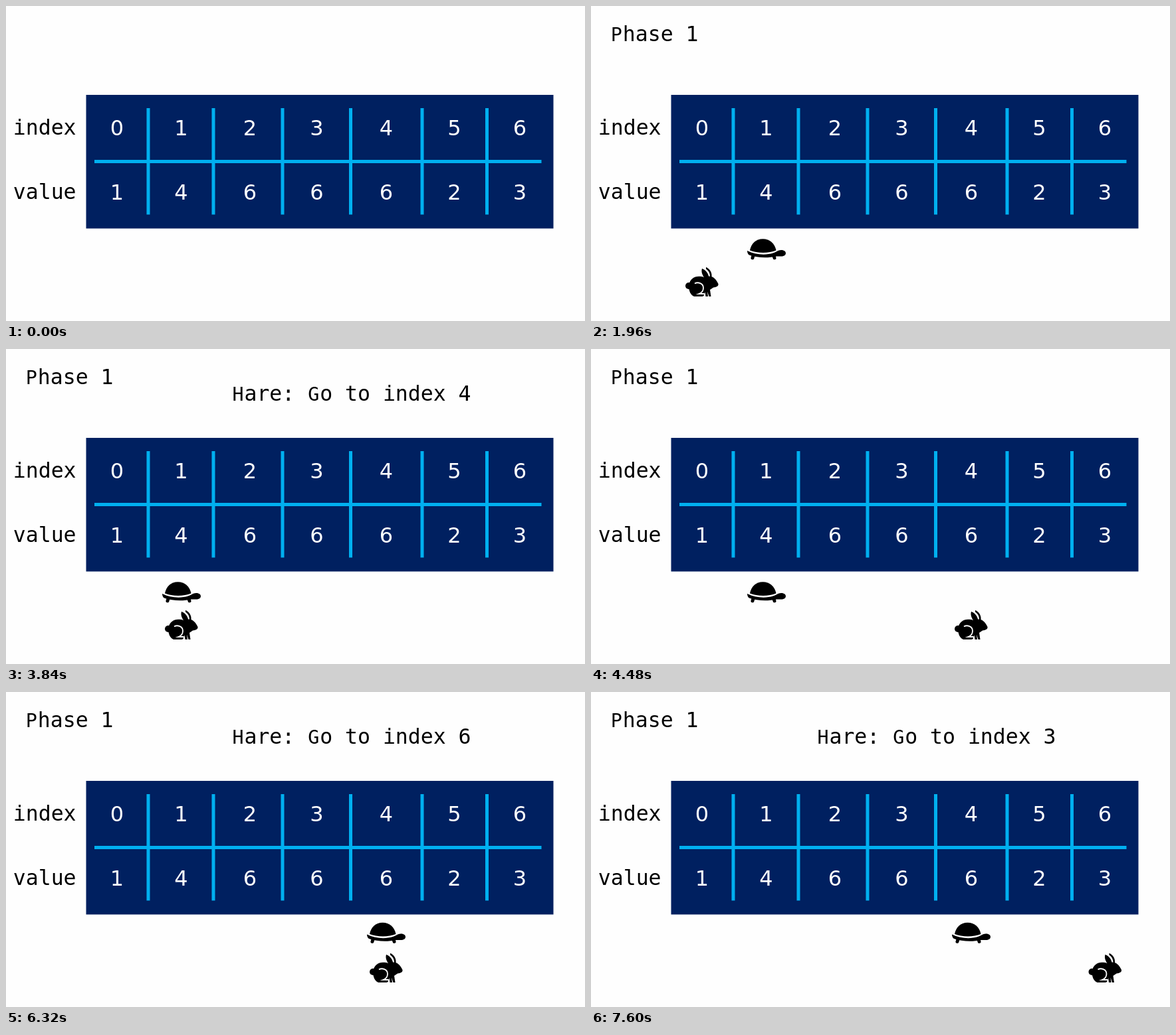
Animation, 871 px wide and 475 px high, one loop 8 s. Source, as an HTML page with a canvas:

```html
<!DOCTYPE html>
<html lang="en">
<head>
<meta charset="utf-8">
<title>Tortoise and hare</title>
<style>
html, body { margin: 0; width: 100%; height: 100%; overflow: hidden; background: #fefefe; }
canvas { display: block; }
</style>
</head>
<body>
<canvas id="stage" width="871" height="475"></canvas>
<script>
const ctx = document.getElementById('stage').getContext('2d');
const LOOP = 8000;
const SIZE = 31.5;
const ADVANCE = 18.95;

const values = [1, 4, 6, 6, 6, 2, 3];
const columns = [167, 263.5, 367, 467.5, 572, 674.5, 773];
const dividers = [214, 312, 416, 518.5, 626, 723.5];

const tortoiseAt = { 0: [138, 347], 1: [235, 350.5], 4: [543, 347] };
const hareAt = { 0: 142, 1: 239, 4: 547, 6: 748.5 };

// start time, tortoise cell, hare cell, instruction
const steps = [
  [0],
  [700, 0, 0, ''],
  [1340, 0, 0, 'Tortoise: Go to index 1'],
  [1960, 1, 0, ''],
  [2570, 1, 0, 'Hare: Go to index 1'],
  [3180, 1, 1, ''],
  [3840, 1, 1, 'Hare: Go to index 4'],
  [4480, 1, 4, ''],
  [5120, 1, 4, 'Tortoise: Go to index 4'],
  [5700, 4, 4, ''],
  [6320, 4, 4, 'Hare: Go to index 6'],
  [6990, 4, 6, ''],
  [7600, 4, 6, 'Hare: Go to index 3']
];

const shell = new Path2D('M4 18 C6 8 13 .8 23.5 .8 C34 .8 41.5 8 43.5 18 C33 22.5 15 22.5 4 18 Z');
const torso = new Path2D('M0 18.5 C12 24.8 28 25.6 39 22 C45 20 46 17.7 51 17.5 C56 17.5 58 20 58 22.3 C58 25.5 55 27 51 27 L44 27 C30 30 15 29.2 3 25 C1 24 0 21 0 18.5 Z');
const tortoiseLegs = new Path2D('M9 26 L8 29.4 M40 26 L41 29.4');

const hareBody = new Path2D('M5 28 C7 19 13 14.8 20 14.8 C24 14.8 26 15 28 16.2 C25.5 12 23.5 8 25 3 C30 5 34 9 35 14.5 C42 14.3 46 19 49.5 26 C50 30 46 31 42 31.5 C40 33 38 34 37 35 L38.5 45 L35.5 45 L33 37.5 L34 45 L30.5 45 L29.5 37 C30 40 28 41 28 42 Q28 45 25 45 L13 45 C8 43 5 37 5 28 Z');
const hareEar = new Path2D('M31 .8 C36 3 40.5 8 39.5 16 L37 15 C37 10 35 6 31 3.5 Z');
const haunch = new Path2D('M14 25.5 C19 22.5 27 25.5 27 32 C27 36.5 24.5 39.5 20.5 41 L28.5 41');

function line(x1, y1, x2, y2) {
  ctx.beginPath();
  ctx.moveTo(x1, y1);
  ctx.lineTo(x2, y2);
  ctx.stroke();
}

// Monospaced text with slightly low capitals; x is the first cell's centre
function label(text, x, y) {
  ctx.fillStyle = '#000';
  [...text].forEach((ch, i) => {
    const size = /[A-Z]/.test(ch) ? SIZE * 0.9 : SIZE;
    ctx.font = `${size}px "DejaVu Sans Mono", monospace`;
    ctx.fillText(ch, x + i * ADVANCE, y);
  });
}

function table() {
  ctx.fillStyle = '#002060';
  ctx.fillRect(120.5, 134, 703, 201.5);
  ctx.strokeStyle = '#00b0f0';
  ctx.lineWidth = 5;
  ctx.lineCap = 'butt';
  dividers.forEach(x => line(x, 154, x, 314.5));
  line(133, 234.5, 805.5, 234.5);

  ctx.fillStyle = '#fff';
  ctx.font = '32px "DejaVu Sans", sans-serif';
  columns.forEach((x, i) => {
    ctx.fillText(i, x, 195);
    ctx.fillText(values[i], x, 292);
  });
}

function tortoise([x, y]) {
  ctx.save();
  ctx.translate(x, y);
  ctx.fillStyle = ctx.strokeStyle = '#000';
  ctx.fill(shell);
  ctx.fill(torso);
  ctx.lineWidth = 5;
  ctx.lineCap = 'round';
  ctx.stroke(tortoiseLegs);
  ctx.restore();
}

function hare(x) {
  ctx.save();
  ctx.translate(x, 393);
  ctx.fillStyle = '#000';
  ctx.fill(hareBody);
  ctx.fill(hareEar);
  ctx.beginPath();
  ctx.arc(5, 29, 5, 0, Math.PI * 2);
  ctx.fill();
  ctx.strokeStyle = '#fefefe';
  ctx.lineWidth = 1.8;
  ctx.stroke(haunch);
  ctx.restore();
}

function draw(time) {
  const [, slow, fast, text] = steps.findLast(step => step[0] <= time);
  ctx.fillStyle = '#fefefe';
  ctx.fillRect(0, 0, 871, 475);
  ctx.textAlign = 'center';
  label('index', 20.3, 194);
  label('value', 20.3, 291);
  table();
  if (slow === undefined) return;
  label('Phase 1', 38.4, 53);
  label(text, 349, 78);
  tortoise(tortoiseAt[slow]);
  hare(hareAt[fast]);
}

const start = performance.now();
function tick() {
  draw((performance.now() - start) % LOOP);
  requestAnimationFrame(tick);
}
tick();
</script>
</body>
</html>
```
